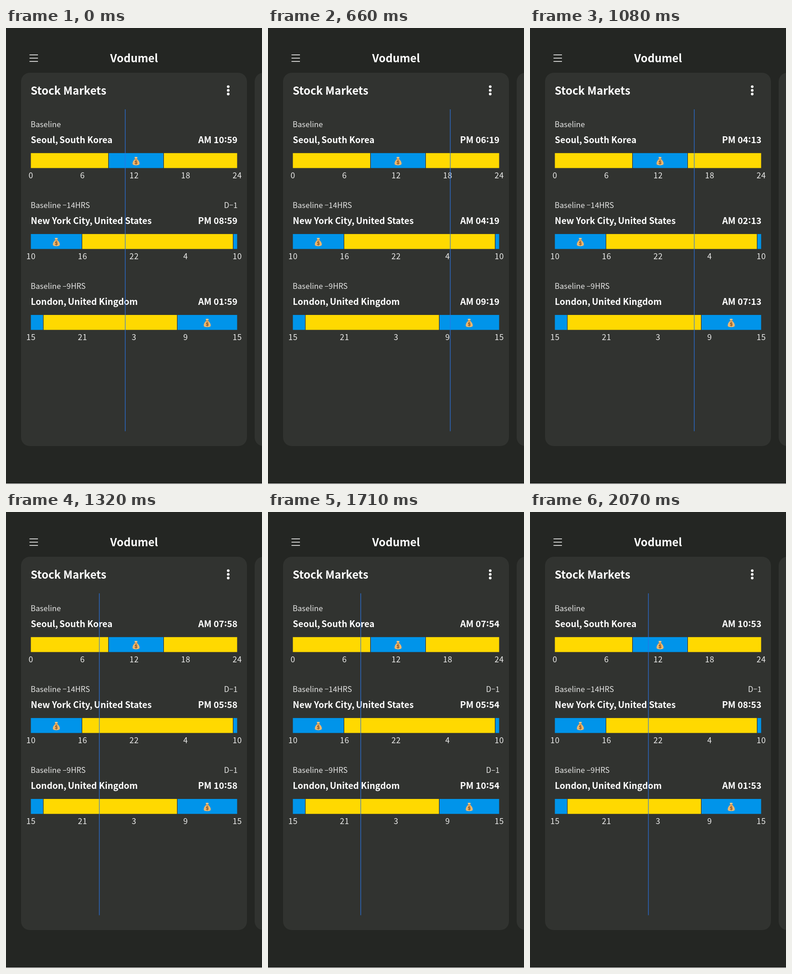
Animation of 561 by 998 pixels, one loop 2.1 s. Source, as an HTML page:

```html
<!DOCTYPE html>
<html lang="en">
<head>
<meta charset="utf-8">
<title>Stock Markets</title>
<style>
  html, body { margin: 0; width: 100%; height: 100%; overflow: hidden; background: #242623; }
  svg { display: block; width: 100vw; height: 100vh; }
  text { font-family: "Noto Sans CJK KR", "Noto Sans CJK JP", "Noto Sans CJK", "Noto Sans", sans-serif; fill: #fff; }
  .title { font-size: 24px; font-weight: 700; }
  .name { font-size: 19.2px; font-weight: 700; }
  .clock { font-size: 19.5px; font-weight: 700; }
  .label { font-size: 16.7px; fill: #e6e6e5; }
  .hour { font-size: 17.5px; letter-spacing: .5px; fill: #ececeb; text-anchor: middle; }
  .end { text-anchor: end; }
  .mid { text-anchor: middle; }
  .card { fill: #313330; }
  .open { fill: #0094ea; }
  .closed { fill: #ffd900; }
</style>
</head>
<body>
<svg id="stage" viewBox="0 0 561 998" preserveAspectRatio="none">
  <defs>
    <g id="bag">
      <path d="M-3.6-9.2Q-2-8-.2-9.4Q1.6-8 3.4-9L2-4.6H-2.2Z" fill="#f3c583"/>
      <path d="M-2.2-4.4H2C5.4-1.8 8 2.4 7.6 6C7.3 8.6 4 9.2 0 9.2S-7.3 8.6-7.6 6C-8 2.4-5.6-1.8-2.2-4.4Z" fill="#edb870"/>
      <path d="M-2.8-4.5H2.6" stroke="#b9783a" stroke-width="1.5" stroke-linecap="round"/>
      <path d="M2.4.6C1.4-.7-2.3-.8-2.3 1C-2.3 3 2.5 2.2 2.5 4.4C2.5 6.3-1.5 6.3-2.6 4.8M0-1.6V7.2" fill="none" stroke="#8c5724" stroke-width="1.3" stroke-linecap="round"/>
    </g>
  </defs>
  <rect width="561" height="998" fill="#242623"/>
  <rect y="997" width="561" height="1" fill="#efecef"/>
  <rect class="card" x="33" y="98" width="495" height="817" rx="19"/>
  <rect class="card" x="545" y="98" width="495" height="817" rx="19"/>
  <path d="M51.5 58.7H70M51.5 66H70M51.5 73.3H70" stroke="#fff" stroke-width="1.6"/>
  <text class="title mid" x="280.7" y="75">Vodumel</text>
  <text class="title" x="54" y="146">Stock Markets</text>
  <g fill="#fff">
    <circle cx="487" cy="128.3" r="2.9"/>
    <circle cx="487" cy="136.4" r="2.9"/>
    <circle cx="487" cy="144.5" r="2.9"/>
  </g>
  <g id="markets"></g>
  <rect id="cursor" y="178" width="1.5" height="704.5" fill="#2b76e5" opacity=".8"/>
</svg>
<script>
const DAY = 1440, LEFT = 54.5, WIDTH = 452, LOOP = 2100, STEP = 30;
const xAt = minutes => LEFT + WIDTH * minutes / DAY;

// Trading spans are in hours along the bar.
const markets = [
  { name: 'Seoul, South Korea', shift: 0, spans: [[9, 15.5]], bag: 285 },
  { name: 'New York City, United States', shift: -14, spans: [[0, 6], [23.5, 24]], bag: 110.3 },
  { name: 'London, United Kingdom', shift: -9, spans: [[0, 1.5], [17, 24]], bag: 441 }
];

// Dragged time of day: [ms, minutes]
const keys = [[0, 659], [390, 659], [660, 1099], [810, 1190], [1080, 973],
  [1320, 478], [1440, 387], [1590, 387], [1710, 474], [2070, 653], [LOOP, 659]];

function add(parent, tag, attrs, text = '') {
  const el = document.createElementNS('http://www.w3.org/2000/svg', tag);
  for (const k in attrs) el.setAttribute(k, attrs[k]);
  if (text !== '') setText(el, text);
  return parent.appendChild(el);
}

// Colons and dashes sit at digit height; the space after a comma is tight.
function setText(el, text) {
  el.innerHTML = String(text)
    .replace(/([:–])(.)/g, '<tspan dy="-1.6">$1</tspan><tspan dy="1.6">$2</tspan>')
    .replace(/, (.)/g, ', <tspan dx="-1.2">$1</tspan>');
}

function buildMarket(m, row) {
  const g = add(document.getElementById('markets'), 'g', { transform: `translate(0 ${row * 177.1})` });
  const right = LEFT + WIDTH;
  const bar = (cls, x1, x2) => add(g, 'rect', { class: cls, x: x1, y: 273.8, width: x2 - x1, height: 32.7 });

  add(g, 'text', { class: 'label', x: LEFT - .5, y: 217 }, 'Baseline' + (m.shift ? ` –${-m.shift}HRS` : ''));
  add(g, 'text', { class: 'name', x: LEFT - .2, y: 251.7 }, m.name);
  m.day = add(g, 'text', { class: 'label end', x: right + 1, y: 217 });
  m.clock = add(g, 'text', { class: 'clock end', x: right + .8, y: 251.7 });

  let from = 0;
  for (const [a, b] of [...m.spans, [24, 24]]) {
    if (a > from) bar('closed', xAt(from * 60) - (from > 0 ? .4 : 0), xAt(a * 60));
    if (b > a) bar('open', xAt(a * 60) + (a > 0 ? 1.3 : 0), xAt(b * 60) - (b < 24 ? 1.6 : 0));
    from = b;
  }
  add(g, 'use', { href: '#bag', x: m.bag, y: 291.2 });

  for (let h = 0; h <= 24; h += 6) {
    const hour = m.shift || h < 24 ? (h + m.shift + 24) % 24 : 24;
    add(g, 'text', { class: 'hour', x: xAt(h * 60) + .2, y: 329.3 }, hour);
  }
}

const slope = i => (keys[i + 1][1] - keys[i][1]) / (keys[i + 1][0] - keys[i][0]);

// Harmonic mean keeps the curve from overshooting its turning points.
function tangent(i) {
  if (i === 0 || i === keys.length - 1) return 0;
  const a = slope(i - 1), b = slope(i);
  return a * b > 0 ? 2 * a * b / (a + b) : 0;
}

function minutesAt(t) {
  const i = keys.findIndex((k, n) => n < keys.length - 1 && t < keys[n + 1][0]);
  const [t0, v0] = keys[i], [t1, v1] = keys[i + 1];
  const d = t1 - t0, u = (t - t0) / d, w = 1 - u;
  return v0 * (1 + 2 * u) * w * w + v1 * (3 - 2 * u) * u * u
    + d * u * w * (w * tangent(i) - u * tangent(i + 1));
}

function clockText(minutes) {
  const pad = n => String(n).padStart(2, '0');
  const h = Math.floor(minutes / 60);
  return `${h < 12 ? 'AM' : 'PM'} ${pad(h % 12 || 12)}:${pad(minutes % 60)}`;
}

const cursor = document.getElementById('cursor');

function draw(now) {
  const t = Math.floor((now % LOOP) / STEP) * STEP;
  const minutes = Math.round(minutesAt(t));
  cursor.setAttribute('x', xAt(minutes) - .75);
  for (const m of markets) {
    const local = minutes + m.shift * 60;
    setText(m.clock, clockText((local + DAY) % DAY));
    setText(m.day, local < 0 ? 'D–1' : '');
  }
}

markets.forEach(buildMarket);
const start = performance.now();
function tick() {
  draw(performance.now() - start);
  requestAnimationFrame(tick);
}
tick();
</script>
</body>
</html>
```
